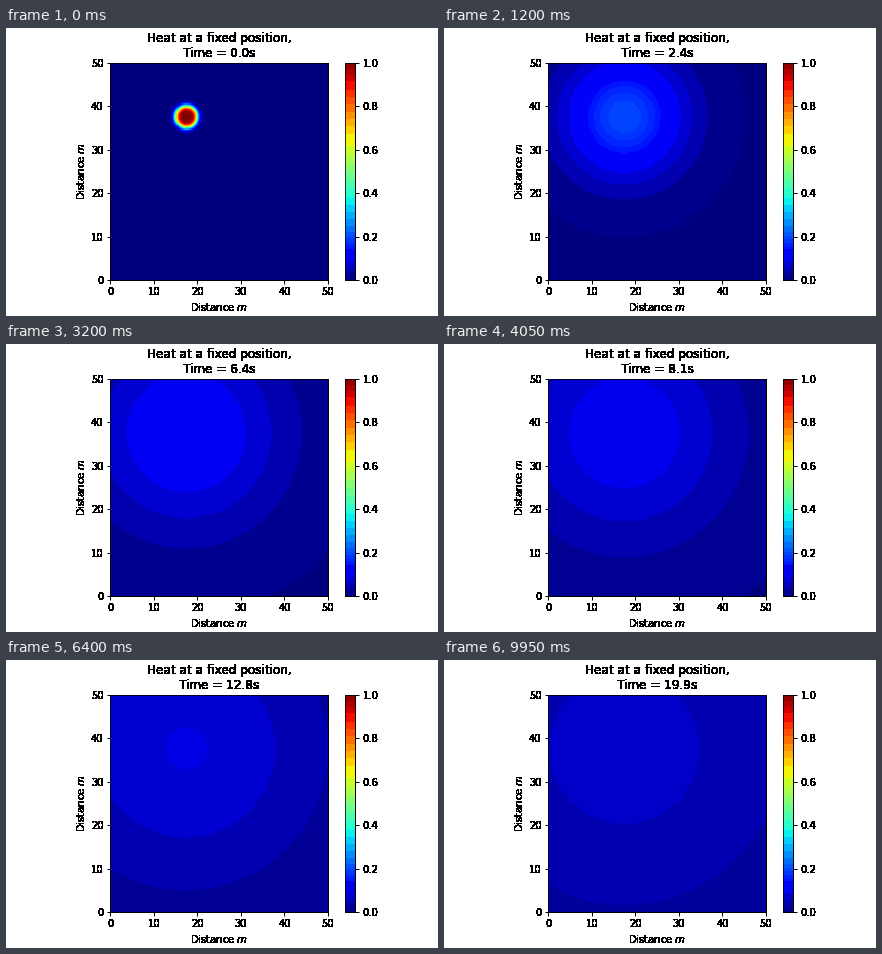
Write a matplotlib script that moves like this. It is 432 px wide and 288 px high and loops after 10 s.

```python
import math

import numpy as np
import matplotlib.pyplot as plt
from matplotlib.animation import FuncAnimation
from matplotlib.colors import ListedColormap
from matplotlib.text import Text

plt.rcParams.update({
    "font.family": "DejaVu Sans",
    "font.size": 10,
    "axes.linewidth": 0.8,
    "xtick.major.width": 1.0,
    "ytick.major.width": 1.0,
    "figure.subplot.bottom": 0.125,
})

FRAMES = 200
INTERVAL = 50
DT = 0.1
START = 0.01
SIZE = 50            # side of the plate, m
CENTRE = (17.5, 37.5)
HALF_WIDTH = 2.5     # radius of the hot spot, m
DIFFUSIVITY = 20
GRID = 200
BAR_WEIGHT = 8.5     # colour bar pixels per colour

axis = np.linspace(0, SIZE, GRID)
X, Y = np.meshgrid(axis, axis)
DISTANCE = np.hypot(X - CENTRE[0], Y - CENTRE[1])
RADII = np.linspace(0, SIZE, 1001)

JET = plt.get_cmap("jet", 256)(np.arange(256), bytes=True)[:, :3].astype(int)


def colour_groups():
    """Group neighbouring colours into coarse RGB cells."""
    red, green, blue = JET.T
    step = np.where((red == 0) & (green < 96), 16, 32)
    cells = np.stack([red // 32, green // step, blue // 32, step], axis=1)
    return np.unique(cells, axis=0, return_inverse=True)[1].ravel()


GROUPS = colour_groups()


def heat(time):
    spread = math.sqrt(4 * DIFFUSIVITY * time)
    profile = [0.5 * (math.erf((r + HALF_WIDTH) / spread)
                      - math.erf((r - HALF_WIDTH) / spread)) for r in RADII]
    return np.interp(DISTANCE, RADII, profile)


def banded_map(values):
    """Give each colour group the mean colour of the pixels in it."""
    index = np.clip((values * 256).astype(int), 0, 255)
    weight = np.bincount(index.ravel(), minlength=256) + BAR_WEIGHT
    total = np.bincount(GROUPS, weights=weight)
    mean = [np.bincount(GROUPS, weights=weight * channel) / total
            for channel in JET.T]
    return ListedColormap(np.stack(mean, axis=1)[GROUPS] / 255)


def harden(image, dpi):
    """Turn soft glyph edges into solid pixels."""
    image = image.copy()
    image[..., :3] = 0
    image[..., 3] = image[..., 3] > 0.02
    return image, 0, 0


fig, ax = plt.subplots(figsize=(6, 4), dpi=72, facecolor="white")
first = heat(START)
image = ax.imshow(first, cmap=banded_map(first), vmin=0, vmax=1,
                  origin="lower", extent=(0, SIZE, 0, SIZE),
                  interpolation="nearest")
bar = fig.colorbar(image, ax=ax)
for box in (ax, bar.ax):
    box.patch.set(edgecolor="black", linewidth=1)  # backs the thin frame
ax.set_xticks(range(0, SIZE + 1, 10))
ax.set_yticks(range(0, SIZE + 1, 10))
ax.set_xlabel("Distance $m$")
ax.set_ylabel("Distance $m$")
title = ax.set_title("Heat at a fixed position,\nTime = 0.0s")

fig.canvas.draw()
for label in fig.findobj(Text):
    if label.get_text():
        label.set_agg_filter(harden)


def update(frame):
    time = START + frame * DT
    values = heat(time)
    image.set_data(values)
    image.set_cmap(banded_map(values))
    title.set_text(f"Heat at a fixed position,\nTime = {time:.1f}s")
    return image, title


anim = FuncAnimation(fig, update, frames=FRAMES, interval=INTERVAL,
                     repeat=True, repeat_delay=0, blit=False)
plt.show()
```
